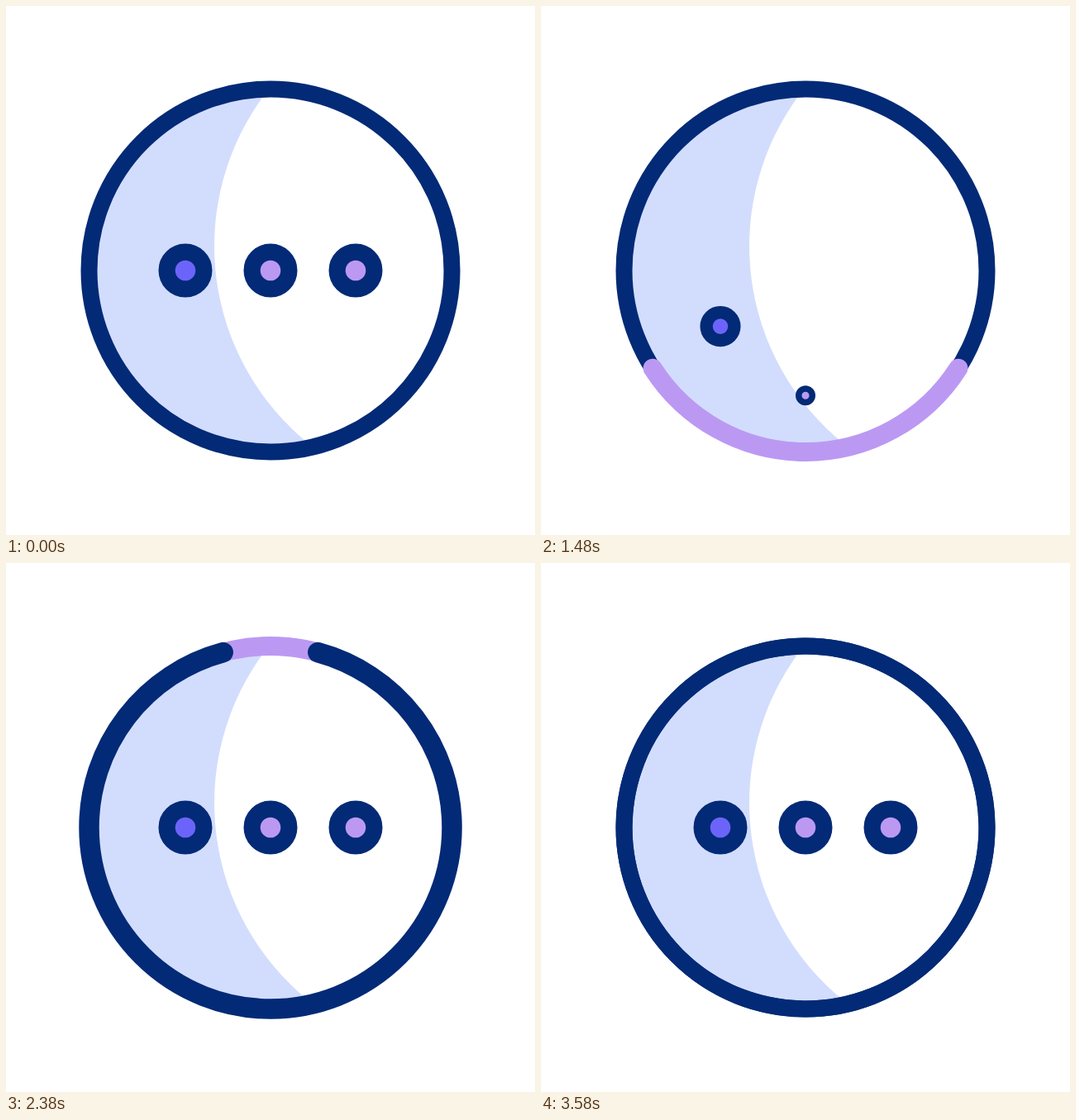
An HTML page that plays this animation: 640x640 px, repeating every 3.6 s.

```html
<!DOCTYPE html>
<html lang="en">
<head>
<meta charset="utf-8">
<title>Loading dots</title>
<style>
  :root {
    --navy: #032a76;
    --lilac: #bb99f3;
    --indigo: #6c64fa;
    --shade: #d2ddfd;
    --loop: 3600ms;
  }
  html, body { margin: 0; width: 100%; height: 100%; overflow: hidden; background: #fff; }
  svg { display: block; width: 100%; height: 100%; }

  .ring { fill: none; stroke: var(--navy); stroke-width: 20; stroke-linecap: round; }
  .lilac { stroke: var(--lilac); stroke-width: 23; animation: lilac var(--loop) infinite; }
  .navy { stroke-width: 24.5; animation: navy var(--loop) infinite; }

  .leave { animation: leave var(--loop) calc(var(--out) * 100ms) infinite; }
  .enter {
    animation: grow var(--loop) calc(var(--in) * 100ms) infinite,
               hop var(--loop) calc(var(--in) * 100ms) infinite;
  }
  .dot { stroke: var(--navy); stroke-width: 20.2; fill: var(--lilac); }
  .first .dot { fill: var(--indigo); }

  /* each arc grows from the bottom of the ring up both sides */
  @keyframes lilac {
    0% { opacity: 0; stroke-dasharray: 0 360; stroke-dashoffset: -180; animation-timing-function: step-end; }
    33.4% { opacity: 1; stroke-dasharray: 0 360; stroke-dashoffset: -180; animation-timing-function: cubic-bezier(.25, .2, .6, 1); }
    63.056% { opacity: 1; stroke-dasharray: 360 360; stroke-dashoffset: 0; animation-timing-function: step-end; }
    72.3%, 100% { opacity: 0; stroke-dasharray: 360 360; stroke-dashoffset: 0; }
  }
  @keyframes navy {
    0% { opacity: 0; stroke-dasharray: 0 360; stroke-dashoffset: -180; stroke-width: 24.5; animation-timing-function: step-end; }
    46.528% { opacity: 1; stroke-dasharray: 0 360; stroke-dashoffset: -180; stroke-width: 24.5; animation-timing-function: cubic-bezier(.25, .2, .6, 1); }
    72.083% { opacity: 1; stroke-dasharray: 360 360; stroke-dashoffset: 0; stroke-width: 24.5; }
    77.778% { opacity: 1; stroke-dasharray: 360 360; stroke-dashoffset: 0; stroke-width: 24.5; animation-timing-function: cubic-bezier(.333, 0, .667, 1); }
    100% { opacity: 1; stroke-dasharray: 360 360; stroke-dashoffset: 0; stroke-width: 20; }
  }

  @keyframes leave {
    0% { scale: 1; animation-timing-function: cubic-bezier(.333, 0, .667, 1); }
    5.556% { scale: 1.2; animation-timing-function: cubic-bezier(.25, .1, .6, 1); }
    16.389% { scale: 0; animation-timing-function: step-end; }
    29.167%, 100% { scale: 1; }
  }
  @keyframes grow {
    0% { scale: 1; animation-timing-function: step-end; }
    22.222% { scale: 0; }
    35% { scale: 0; animation-timing-function: cubic-bezier(.3, .2, .6, 1); }
    47.222% { scale: 1.2; animation-timing-function: cubic-bezier(.333, 0, .667, 1); }
    56.389%, 100% { scale: 1; }
  }
  @keyframes hop {
    0% { translate: 0 0; animation-timing-function: step-end; }
    22.222% { translate: 0 200px; }
    35% { translate: 0 200px; animation-timing-function: cubic-bezier(.333, 0, .667, 1); }
    47.222% { translate: 0 -63px; animation-timing-function: cubic-bezier(.333, 0, .667, 1); }
    55.556%, 100% { translate: 0 0; }
  }
</style>
</head>
<body>
<svg viewBox="0 0 640 640">
  <defs>
    <path id="circle" pathLength="360" d="M320 100.5A219.5 219.5 0 0 1 320 539.5A219.5 219.5 0 0 1 320 100.5"/>
    <circle id="dot" r="22.4"/>
  </defs>
  <path fill="var(--shade)" d="M314.4 105A307 307 0 0 0 367 530A215.2 215.2 0 1 1 314.4 105Z"/>

  <g transform="translate(217 320)" class="first" style="--out: 2; --in: 0">
    <g class="leave"><g class="enter"><use href="#dot" class="dot"/></g></g>
  </g>
  <g transform="translate(320 320)" style="--out: 1; --in: 1">
    <g class="leave"><g class="enter"><use href="#dot" class="dot"/></g></g>
  </g>
  <g transform="translate(423 320)" style="--out: 0; --in: 2">
    <g class="leave"><g class="enter"><use href="#dot" class="dot"/></g></g>
  </g>

  <use href="#circle" class="ring"/>
  <use href="#circle" class="ring lilac"/>
  <use href="#circle" class="ring navy"/>
</svg>
</body>
</html>
```
